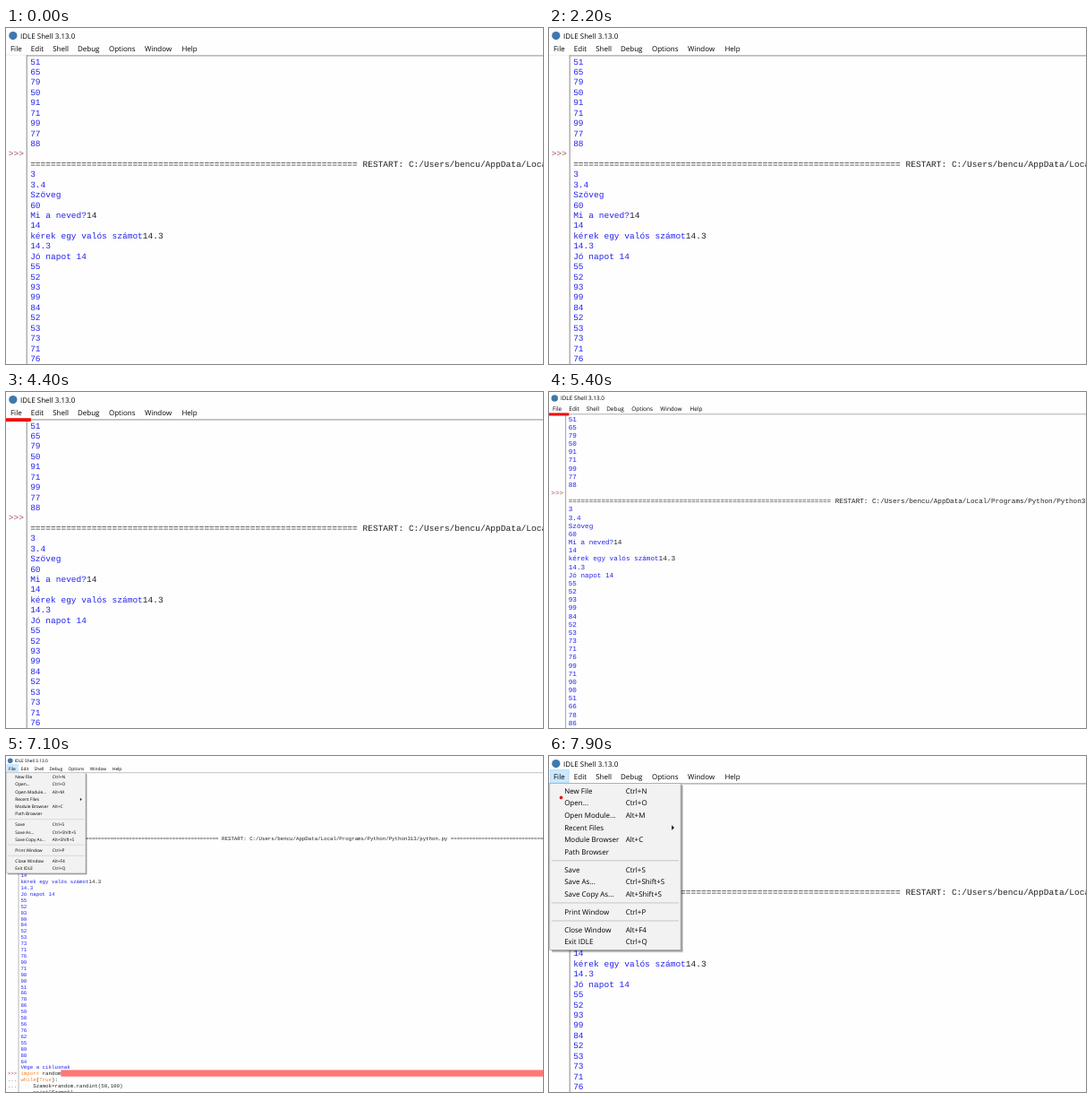
An HTML page that plays this animation: 600x375 px, repeating every 8000 ms.

```html
<!DOCTYPE html>
<html lang="hu">
<head>
<meta charset="utf-8">
<title>IDLE Shell</title>
<style>
  html, body { margin: 0; width: 100%; height: 100%; overflow: hidden; background: #fefefe; }
  svg { display: block; width: 100vw; height: 100vh; }
  text { white-space: pre; text-rendering: geometricPrecision; }
  .ui { font: 11.2px "Open Sans", "Noto Sans", sans-serif; fill: #000; }
  .code { font: 13.333px "Liberation Mono", monospace; }
</style>
</head>
<body>
<svg id="stage" viewBox="0 0 1680 1050" preserveAspectRatio="xMinYMin slice"></svg>
<script>
// All coordinates are desktop pixels (1680 x 1050); the camera zooms from the top left corner.
const LOOP = 8000, STEP = 100, W = 1680, H = 1050;
const BLUE = '#2424ee', BLACK = '#222', ORANGE = '#ff8420', PURPLE = '#982098',
      GREEN = '#18aa18', RED = '#ff2020', PROMPT = '#a85858';
const stage = document.getElementById('stage');

function add(parent, tag, attrs, content) {
  const el = document.createElementNS('http://www.w3.org/2000/svg', tag);
  for (const k in attrs) el.setAttribute(k, attrs[k]);
  if (content !== undefined) el.textContent = content;
  parent.appendChild(el);
  return el;
}
const group = () => add(stage, 'g', {});
const rect = (g, x, y, width, height, fill, more) =>
  add(g, 'rect', { x, y, width, height, fill, ...more });
const path = (g, d, stroke = '#222', width = 1, fill = 'none') =>
  add(g, 'path', { d, stroke, fill, 'stroke-width': width });
const disc = (g, cx, cy, r, fill) => add(g, 'circle', { cx, cy, r, fill });
const label = (g, x, y, str, more) => add(g, 'text', { x, y, class: 'ui', ...more }, str);

const desk = group(), mark = group(), menu = group(), pointer = group(), dot = group();

// Shell text
const baseline = i => 56.8 + 16 * i;
function row(i, ...parts) {
  const t = add(desk, 'text', { x: 38, y: baseline(i), class: 'code' });
  for (const [str, fill] of parts) add(t, 'tspan', { fill }, str);
}
const prompt = (i, str) =>
  add(desk, 'text', { x: 4, y: baseline(i), class: 'code', fill: PROMPT }, str);
const column = (from, list) =>
  list.split(' ').forEach((n, i) => row(from + i, [n, BLUE]));

function drawShell() {
  column(0, '51 65 79 50 91 71 99 77 88');
  prompt(9, '>>>');
  row(10, ['='.repeat(64) +
    ' RESTART: C:/Users/bencu/AppData/Local/Programs/Python/Python313/python.py ' +
    '='.repeat(63), BLACK]);
  column(11, '3 3.4 Szöveg 60');
  row(15, ['Mi a neved?', BLUE], ['14', BLACK]);
  row(16, ['14', BLUE]);
  row(17, ['kérek egy valós számot', BLUE], ['14.3', BLACK]);
  row(18, ['14.3', BLUE]);
  row(19, ['Jó napot 14', BLUE]);
  column(20, '55 52 93 99 84 52 53 73 71 76 99 71 90 90 51 66 78 86 59 58 56 76 62 55 89 88 64');
  row(47, ['Vége a ciklusnak', BLUE]);

  rect(desk, 142, 811, 1516, 17, '#ff7777');
  prompt(48, '>>>');
  for (let i = 49; i < 57; i++) prompt(i, '...');
  row(48, ['import', ORANGE], [' random', BLACK]);
  row(49, ['while', ORANGE], ['(', BLACK], ['True', ORANGE], ['):', BLACK]);
  row(50, ['    Szamok=random.randint(50,100)', BLACK]);
  row(51, ['    print', PURPLE], ['(Szamok)', BLACK]);
  row(52, ['    if', ORANGE], ['(Szamok==64):', BLACK]);
  row(53, ['        break', ORANGE]);
  row(54, ['    else', ORANGE], [':', BLACK]);
  row(55, ['        continue', ORANGE]);
  row(56, ['print', PURPLE], ['(', BLACK], ['"Vége a ciklusnak"', GREEN], [')', BLACK]);
  row(57, ['SyntaxError: multiple statements found while compiling a single statement', RED]);
  prompt(58, '>>>');
}

const menuBar = [['File', 7], ['Edit', 39], ['Shell', 73], ['Debug', 112],
                 ['Options', 161], ['Window', 217], ['Help', 275]];

function drawWindow() {
  rect(desk, 0, 0, W, H, '#fefefe');
  disc(desk, 11, 12, 6.5, '#3f78ad');
  label(desk, 22.5, 16.2, 'IDLE Shell 3.13.0');
  path(desk, 'M1559 10h10M1604 5.5h9v9h-9zM1649 5l10 10m0-10l-10 10');
  for (const [name, x] of menuBar) label(desk, x, 37, name);
  path(desk, 'M0 43H32', '#ececec');
  path(desk, 'M32 43.2H1660', '#a4a4a4', 1.5);
  path(desk, 'M32.5 42.5V990', '#999', 1.6);

  rect(desk, 1661, 43, 19, 947, '#f0f0f0');
  rect(desk, 1662, 820, 18, 152, '#cdcdcd');
  path(desk, 'M1666 53l4-4 4 4M1666 980l4 4 4-4', '#555', 1.5);
  rect(desk, 0, 990, W, 20, '#f0f0f0');
  label(desk, 1593, 1004, 'Ln: 345');
  label(desk, 1644, 1004, 'Col: 0');
}

function drawTaskbar() {
  rect(desk, 0, 1010, W, 40, '#dde7f0');
  rect(desk, 17, 1023, 14, 14, '#222');
  rect(desk, 49, 1010, 280, 40, '#f8fafb', { stroke: '#c5ccd2' });
  add(desk, 'circle', { cx: 69, cy: 1027, r: 5.5, fill: 'none', stroke: '#222', 'stroke-width': 1.5 });
  path(desk, 'M65 1031l-5 6', '#222', 1.5);
  label(desk, 87, 1035, 'Type here to search', { style: 'font-size:14px;fill:#444' });

  rect(desk, 634, 1010, 48, 40, '#f4f8fb');
  const apps = ['#f2c452', '#4b4b45', '#df5143', '#1fb858', '#5967ea', '#262226', '#bcc8d2', '#3ba3b5'];
  apps.forEach((fill, i) => {
    const x = 362 + i * 49.3;
    if (i === 0) rect(desk, x - 11, 1020, 22, 19, fill);
    else disc(desk, x, 1030, 11.5, fill);
    if (i !== 1) rect(desk, x - 18, 1047, 36, 3, '#1b78c8');
  });

  path(desk, 'M1414 1033l6-6 6 6', '#222', 1.5);
  rect(desk, 1441, 1022, 6, 11, 'none', { rx: 3, stroke: '#222' });
  path(desk, 'M1438 1030c0 8 12 8 12 0M1444 1036v4', '#222', 1.2);
  path(desk, 'M1464 1037v-5a6 6 0 0 1 12 0v5z', '#222', 1.5);
  path(desk, 'M1486 1024h14v9h-14zM1490 1037h7', '#222', 1.5);
  path(desk, 'M1508 1027h3l5-5v16l-5-5h-3zM1519 1026q4 4 0 8', '#222', 1.2);
  const mid = { 'text-anchor': 'middle' };
  label(desk, 1543, 1025, 'ENG', mid);
  label(desk, 1543, 1043, 'HU', mid);
  label(desk, 1596, 1025, '2:23 AM', mid);
  label(desk, 1596, 1043, '11/15/2024', mid);
  path(desk, 'M1641 1022h15v13h-9l-3 4v-4h-3z', '#222', 1.2, '#333');
  disc(desk, 1657, 1037, 6, '#222');
  label(desk, 1657, 1040, '2', { ...mid, style: 'font-size:8px;fill:#fff' });
}

const fileMenu = ['New File|Ctrl+N', 'Open...|Ctrl+O', 'Open Module...|Alt+M', 'Recent Files|>',
  'Module Browser|Alt+C', 'Path Browser|', '', 'Save|Ctrl+S', 'Save As...|Ctrl+Shift+S',
  'Save Copy As...|Alt+Shift+S', '', 'Print Window|Ctrl+P', '', 'Close Window|Alt+F4', 'Exit IDLE|Ctrl+Q'];

function drawMenu() {
  rect(menu, 2, 22, 29, 20, '#cce8ff', { stroke: '#a5d5fb' });
  label(menu, 7, 37, 'File');
  rect(menu, 5, 46, 205, 261, '#000', { opacity: .18 });
  rect(menu, 4, 45, 204.5, 260.5, '#000', { opacity: .25 });
  rect(menu, 1, 42.5, 205, 260.5, '#f2f2f2', { stroke: '#a0a0a0' });
  let y = 45;
  for (const item of fileMenu) {
    if (!item) {
      path(menu, `M4 ${y + 4.5}H203`, '#b4b4b4');
      y += 9;
      continue;
    }
    const [name, keys] = item.split('|');
    label(menu, 24, y + 13.5, name);
    if (keys === '>') path(menu, `M192 ${y + 6}l4 4-4 4z`, 'none', 0, '#111');
    else label(menu, 120, y + 13.5, keys);
    y += 19;
  }
}

drawWindow();
drawShell();
drawTaskbar();
drawMenu();
const underline = rect(mark, 0, 40.8, 39, 5.4, '#ee1010');
path(pointer, 'M8 24v17l4-4 3 7 3-1-3-7h6z', '#111', 1.2, '#fff');
disc(dot, 19, 65, 2.6, '#e81818');

const clamp = x => Math.min(1, Math.max(0, x));
const ramp = (t, from, span) => clamp((t - from) / span);
const smooth = x => x * x * (3 - 2 * x);
const show = (el, on) => el.setAttribute('visibility', on ? 'visible' : 'hidden');

function render(time) {
  const t = Math.floor(time % LOOP / STEP) * STEP;
  const zoom = 2 ** (1 - smooth(ramp(t, 5300, 266)) + smooth(ramp(t, 7000, 290)));
  stage.setAttribute('viewBox', `0 0 ${W / zoom} ${H / zoom}`);
  underline.setAttribute('width', 39 * ramp(t, 2700, 800));
  show(mark, t >= 2800 && t < 5700);
  show(pointer, t >= 5700 && t < 6900);
  show(menu, t >= 6500);
  show(dot, t >= 7900);
}

const start = performance.now();
function tick() {
  render(performance.now() - start);
  requestAnimationFrame(tick);
}
tick();
</script>
</body>
</html>
```
